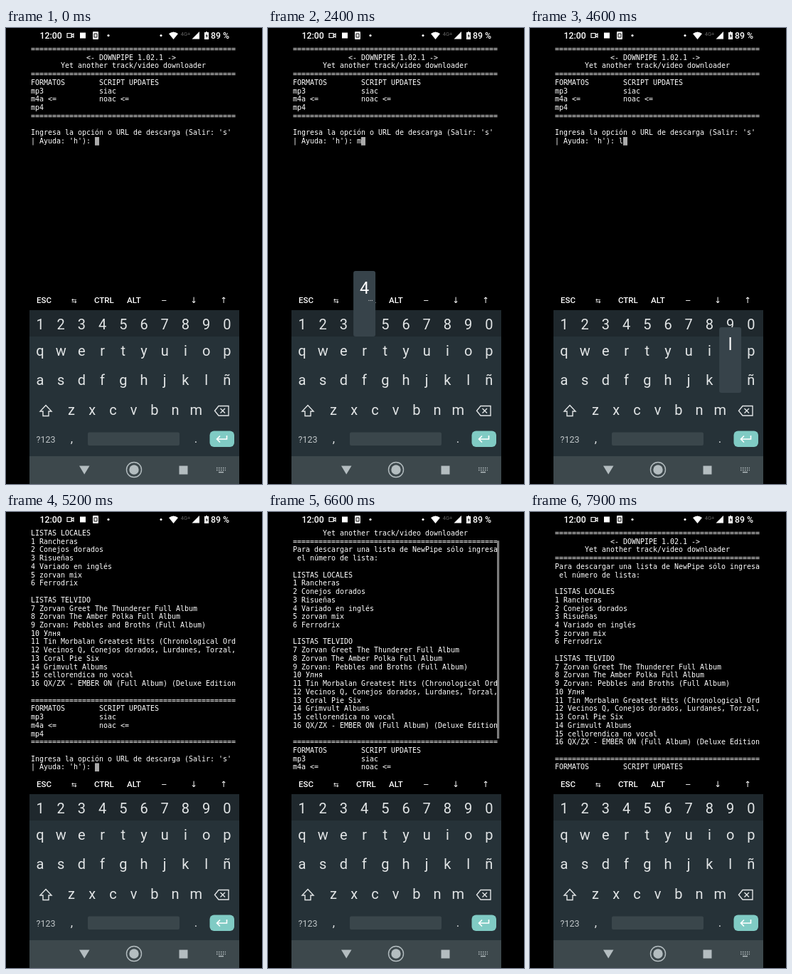
An HTML page with a canvas for the animation above (8000 ms loop, 360 by 640 pixels).

```html
<!DOCTYPE html>
<html lang="es">
<head>
<meta charset="utf-8">
<style>
html, body { margin: 0; width: 100%; height: 100%; overflow: hidden; background: #000; }
canvas { display: block; }
</style>
</head>
<body>
<canvas id="stage" width="360" height="640"></canvas>
<script>
const ctx = document.getElementById('stage').getContext('2d');
const LOOP = 8000, ROWS = 29, TOP = 24, LEFT = 35, LINE = 11.73, CHAR = 6;
const INK = '#fff', KEY = '#e2e5e6', NAV = '#b4bdc0';
const SANS = 'Roboto, sans-serif', MONO = '"DejaVu Sans Mono", monospace';

const rule = '='.repeat(48);
const header = [rule, '             <- DOWNPIPE 1.02.1 ->', '       Yet another track/video downloader', rule];
const menu = ['FORMATOS        SCRIPT UPDATES', 'mp3             siac', 'm4a <=          noac <=', 'mp4', rule, '',
  "Ingresa la opción o URL de descarga (Salir: 's'", "| Ayuda: 'h'): "];
const lists = ['Para descargar una lista de NewPipe sólo ingresa', ' el número de lista:', '',
  'LISTAS LOCALES', '1 Rancheras', '2 Conejos dorados', '3 Risueñas', '4 Variado en inglés', '5 zorvan mix', '6 Ferrodrix', '',
  'LISTAS TELVIDO', '7 Zorvan Greet The Thunderer Full Album', '8 Zorvan The Amber Polka Full Album',
  '9 Zorvan: Pebbles and Broths (Full Album)', '10 Улня', '11 Tin Morbalan Greatest Hits (Chronological Ord',
  '12 Vecinos Q, Conejos dorados, Lurdanes, Torzal,', '13 Coral Pie Six', '14 Grimvult Albums',
  '15 cellorendica no vocal', '16 QX/ZX - EMBER ON (Full Album) (Deluxe Edition', '', rule];
const shortPage = [...header, ...menu], longPage = [...header, ...lists, ...menu];

// [start time, value] steps
const typing = [[0, ''], [1800, 'm'], [2500, 'm4'], [3300, 'm4a'], [4200, ''], [4600, 'l'], [5200, '']];
const scroll = [[0, 7], [6400, 6], [6500, 4], [6600, 2], [6700, 1], [6800, 0]];
const popup = [[0, ''], [1700, 'm'], [1800, ''], [2400, '4'], [2600, ''], [3200, 'a'], [3400, ''], [4500, 'l'], [4700, '']];
const at = (steps, t) => steps.findLast(([start]) => t >= start)[1];

const keyRows = [['1234567890', 48, 416], ['qwertyuiop', 48, 454], ['asdfghjklñ', 48, 495], ['zxcvbnm', 92, 537]];
const keys = keyRows.flatMap(([chars, x, y]) => [...chars].map((char, i) => ({ char, x: x + i * 29.2, y })));

function text(str, x, y, size, color = KEY, align = 'center', weight = 400, family = SANS) {
  ctx.font = `${weight} ${size}px ${family}`;
  ctx.textAlign = align;
  ctx.fillStyle = color;
  ctx.fillText(str, x, y);
}
function rect(x, y, w, h, color, radius = 0) {
  ctx.fillStyle = color;
  ctx.beginPath();
  ctx.roundRect(x, y, w, h, radius);
  ctx.fill();
}
function fill(d, color) {
  ctx.fillStyle = color;
  ctx.fill(new Path2D(d));
}
function line(d, color, width = 1.4) {
  ctx.strokeStyle = color;
  ctx.lineWidth = width;
  ctx.stroke(new Path2D(d));
}
function dot(x, y, r, color) {
  ctx.fillStyle = color;
  ctx.beginPath();
  ctx.arc(x, y, r, 0, 7);
  ctx.fill();
}

function statusBar() {
  text('12:00', 47.5, 15, 12.3, '#fff', 'left', 500);
  line('M86 7.5h6v6h-6zM92 10l3-2v5l-3-2', '#fff', 1.2);
  rect(104, 6.5, 8, 8, '#fff');
  rect(122, 5, 8, 11, '#e8e8e8', 1);
  line('M124 8h4v5h-4z', '#222', 1);
  dot(144, 10.5, 1.6, '#fff');
  dot(218, 10.5, 1.6, '#fff');
  fill('M229 8Q235.5 3 242 8L235.5 16Z', '#fff');
  text('4G+', 252.5, 10.5, 7.5, '#666');
  fill('M272 5V15.5H261.5Z', '#fff');
  fill('M279 6h2V5h2v1h2v10h-6z', '#fff');
  fill('M282.5 8l-2 3.5h1.5v2.5l2-3.5h-1.5z', '#222');
  text('89 %', 288, 15, 12.3, '#fff', 'left', 500);
}

function terminal(t) {
  const isLong = t >= 5200;
  const page = isLong ? longPage : shortPage;
  const first = isLong ? at(scroll, t) : 0;
  const typed = at(typing, t);
  page.slice(first, first + ROWS).forEach((str, row) => {
    const last = first + row === page.length - 1;
    const y = TOP + row * LINE;
    text(last ? str + typed : str, LEFT, y + 9, 9.97, INK, 'left', 400, MONO);
    if (last) rect(LEFT + (str.length + typed.length) * CHAR, y, CHAR, LINE, '#aaa');
  });
  if (t >= 6400 && t < 7200) {
    const step = 345 / page.length;
    ctx.globalAlpha = Math.min(1, (7200 - t) / 300);
    rect(322, 21 + first * step, 3.2, ROWS * step, '#7c7c7c');
    ctx.globalAlpha = 1;
  }
}

function extraKeys() {
  ['ESC', '⇆', 'CTRL', 'ALT', '—', '↓', '↑'].forEach((label, i) => {
    const size = label === '⇆' ? 9 : label === '—' ? 9.5 : 11.5;
    text(label, 53.5 + i * 42.15, 385.5, size, '#fff', 'center', 500, 'Roboto, "DejaVu Sans", sans-serif');
  });
}

function keyboard() {
  rect(33, 396, 295, 38, '#1f282d');
  rect(33, 433, 295, 169, '#263238');
  rect(33, 601, 295, 39, '#3d484c');
  keys.forEach(({ char, x, y }) => text(char, x, y + (y === 416 ? 6.5 : 6), 20));

  line('M56 529.5L64 538H60V544.5H52V538H48Z', KEY);
  line('M299 530.5H313V544H299L293.5 537.3ZM301.5 534l6.5 6.5M308 534l-6.5 6.5', KEY);
  text('?123', 56, 581.5, 12.5, '#c0c6c8');
  text(',', 92.5, 582, 17);
  rect(115, 567.5, 129, 18.5, '#3a464b', 2);
  text('.', 267, 582, 17);
  rect(286.5, 565.5, 34.5, 22.5, '#80cbc4', 6);
  line('M310.5 572v5H297M301 572.5l-4.5 4.5 4.5 4.5', '#fff', 1.6);

  fill('M103 614.5H117.5L110.2 626.5Z', NAV);
  line('M169.5 620a10.5 10.5 0 1 0 21 0a10.5 10.5 0 1 0-21 0', NAV, 1.4);
  dot(180, 620, 6.7, NAV);
  rect(243.5, 614.5, 12, 12, NAV);
  ctx.setLineDash([1.5, 1.5]);
  line('M296 617.5h13M296 620.5h13', NAV, 1.5);
  ctx.setLineDash([]);
  line('M299 623.5h7', NAV, 1.5);
}

function keyPopup(char) {
  const key = keys.find(k => k.char === char);
  if (!key) return;
  rect(key.x - 15.5, key.y - 75, 31, 92, '#37434a', 3);
  text(char, key.x, key.y - 43, 23.5, '#fff');
  if ('4a'.includes(char)) text('…', key.x + 8.5, key.y - 33, 11, '#ddd');
}

function draw() {
  const t = performance.now() % LOOP;
  rect(0, 0, 360, 640, '#000');
  statusBar();
  terminal(t);
  extraKeys();
  keyboard();
  keyPopup(at(popup, t));
  requestAnimationFrame(draw);
}
draw();
</script>
</body>
</html>
```
